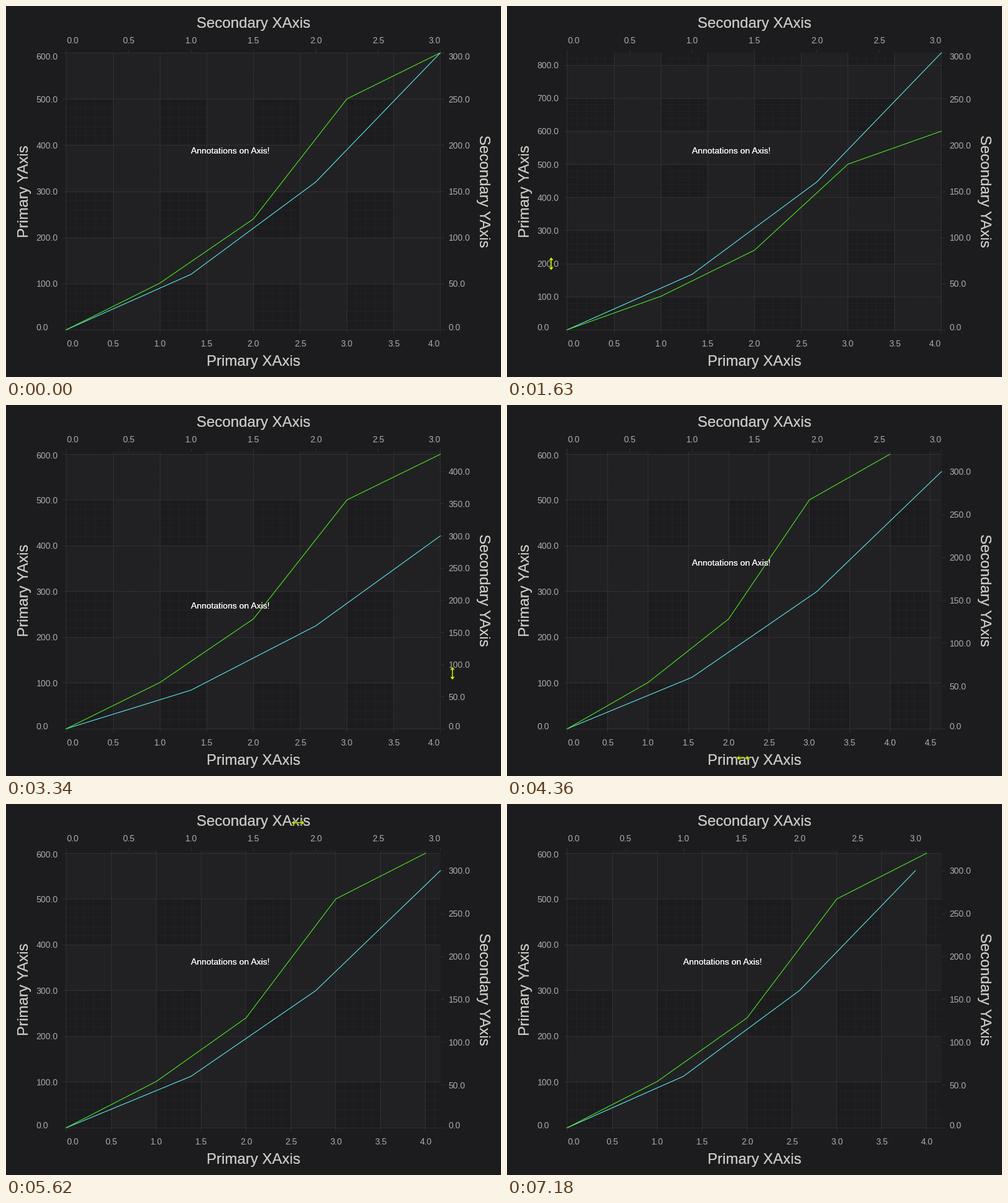
Write a matplotlib script that moves like this. It is 795 px wide and 596 px high and loops after 7710 ms.

```python
import math

import matplotlib.pyplot as plt
import numpy as np
from matplotlib.animation import FuncAnimation
from matplotlib.collections import LineCollection, PolyCollection
from matplotlib.patches import Polygon, Rectangle

plt.rcParams["font.family"] = "Liberation Sans"
plt.rcParams["text.hinting"] = "default"
plt.rcParams["toolbar"] = "None"

STAGE_W, STAGE_H, DPI = 795, 596, 100
PX = 72 / DPI  # points per pixel
STEP, FRAMES = 30, 257

LEFT, TOP, WIDTH, HEIGHT = 97, 75, 600.8, 445
RIGHT, BOTTOM = LEFT + WIDTH, TOP + HEIGHT

BG, BAND = "#1c1c1e", "#212123"
MAJOR, MINOR = "#313134", "#222225"
LABEL, TITLE = "#adadad", "#c8c7c3"
GREEN, CYAN, POINTER = "#50ff20", "#64ffff", "#c8f400"

GREEN_XY = np.array([(0, 0), (1, 101), (2, 240), (3, 500), (4, 600)])
CYAN_XY = np.array([(0, 0), (1, 60), (2, 160), (3, 300)])


class Drag:
    """Pulls one axis out and lets most of it back, along a sine arc."""

    def __init__(self, top, start, end, grab, reach, net, vertical):
        self.top, self.start, self.end = top, start, end
        self.grab, self.reach, self.net = np.array(grab), reach, net
        self.way = np.array((0, 1) if vertical else (-1, 0))
        self.size = HEIGHT if vertical else WIDTH

    def offset(self, t):
        u = np.clip((t - self.start) / (self.end - self.start), 0, 1)
        return self.net * u + self.reach * math.sin(math.pi * u)

    def axis_max(self, t):
        return self.top * math.exp(self.offset(t) / self.size)

    def point(self, t):
        return self.grab + self.way * self.offset(t)


left_drag = Drag(600, 600, 1960, (71, 266), 210, 4, True)
right_drag = Drag(300, 2560, 3730, (717, 270), 160.4, 33.2, True)
bottom_drag = Drag(4, 4180, 5150, (468, 567), 153.4, 24.3, False)
top_drag = Drag(3, 5800, 6700, (469, 30), 110, 43.3, False)
DRAGS = [left_drag, right_drag, bottom_drag, top_drag]

# Where the pointer passes between drags: time, x, y
ENTER, LEAVE = (460, 28, 258), (7180, 790, 592)
STOPS = [ENTER, (2380, 758, 265), (4090, 468, 567), (5560, 469, 30), LEAVE]
ROUTE = np.array(sorted(
    STOPS + [(t, *d.point(t)) for d in DRAGS for t in (d.start, d.end)]))


def pointer_at(t):
    for drag in DRAGS:
        if drag.start <= t <= drag.end:
            return drag.point(t)
    return [np.interp(t, ROUTE[:, 0], ROUTE[:, k]) for k in (1, 2)]


def nice_step(top):
    raw = top / 10
    base = 10 ** math.floor(math.log10(raw))
    return next(m * base for m in (1, 2, 5, 10) if m * base >= raw - 1e-9)


def ticks(top, step):
    return np.arange(int(top / step + 1e-9) + 1) * step


def to_x(v, top):
    return LEFT + WIDTH * np.asarray(v) / top


def to_y(v, top):
    return BOTTOM - HEIGHT * np.asarray(v) / top


# Grid lines sit on pixel centres
def verticals(xs, y0, y1):
    return [((x, y0), (x, y1)) for x in np.round(xs - 0.5) + 0.5]


def horizontals(ys, x0, x1):
    return [((x0, y), (x1, y)) for y in np.round(ys) + 0.5]


def rect(x0, y0, x1, y1):
    return [(x0, y0), (x1, y0), (x1, y1), (x0, y1)]


fig = plt.figure(figsize=(STAGE_W / DPI, STAGE_H / DPI), dpi=DPI, facecolor=BG)
ax = fig.add_axes([0, 0, 1, 1])
ax.set_xlim(0, STAGE_W)
ax.set_ylim(STAGE_H, 0)
ax.axis("off")


def text(x, y, s, size, color, **kw):
    return ax.text(x, y, s, fontsize=size * PX, color=color, va="baseline",
                   rotation_mode="anchor", **kw)


def strong_text(*args, **kw):
    """Two passes thicken the soft edges of the letters."""
    return [text(*args, **kw) for _ in range(2)]


def lines(color, z):
    group = LineCollection([], colors=color, linewidths=PX, zorder=z,
                           capstyle="butt", snap=False)
    return ax.add_collection(group, autolim=False)


def label_row(align):
    return [text(0, 0, "", 14, LABEL, ha=align, zorder=6) for _ in range(12)]


bands = ax.add_collection(
    PolyCollection([], facecolors=BAND, edgecolors="none", antialiaseds=False,
                   zorder=1), autolim=False)
minor, major, marks = lines(MINOR, 2), lines(MAJOR, 3), lines(MAJOR, 3)

clip = Rectangle((LEFT - 1, TOP - 0.5), WIDTH + 2, HEIGHT + 1.5,
                 transform=ax.transData)
cyan, = ax.plot([], [], color=CYAN, lw=PX, zorder=4)
green, = ax.plot([], [], color=GREEN, lw=PX, zorder=5)
for curve in (cyan, green):
    curve.set_clip_path(clip)

mid_x, mid_y = (LEFT + RIGHT) / 2, (TOP + BOTTOM) / 2
for x, y, name, turn in [(mid_x, 35, "Secondary XAxis", 0),
                         (mid_x, 578, "Primary XAxis", 0),
                         (36, mid_y, "Primary YAxis", 90),
                         (760, mid_y, "Secondary YAxis", 270)]:
    strong_text(x, y, name, 24, TITLE, ha="center", rotation=turn)

bottom_labels, top_labels = label_row("center"), label_row("center")
left_labels, right_labels = label_row("left"), label_row("left")
note = strong_text(0, 0, "Annotations on Axis!", 14, "white", ha="left",
                   zorder=7)

half = [(0, -10.5), (4, -5.5), (1, -5.5)]
half += [(x, -y) for x, y in half[::-1]]
ARROW = np.array(half + [(-x, y) for x, y in half[::-1]])
pointer = ax.add_patch(Polygon(ARROW, closed=True, facecolor=POINTER,
                               edgecolor="#20240a", lw=0.5 * PX, zorder=9))


def fill_labels(row, values, xs, ys):
    xs, ys, values = np.broadcast_arrays(xs, ys, values)
    for i, label in enumerate(row):
        label.set_visible(i < len(values))
        if i < len(values):
            label.set_text(f"{values[i]:.1f}")
            label.set_position((xs[i], ys[i]))


def fill_x(row, values, xs, baseline):
    fill_labels(row, values, np.clip(xs, LEFT + 10, RIGHT - 10), baseline)


def fill_y(row, values, ys, x):
    fill_labels(row, values, x, np.clip(ys, TOP + 6, BOTTOM - 4.5) + 5.5)


def move_pointer(t):
    x, y = pointer_at(t)
    in_x, in_y = LEFT < x < RIGHT, TOP < y < BOTTOM
    # Only shown beside the plot, over one of the axes
    pointer.set_visible(ENTER[0] <= t < LEAVE[0] and in_x != in_y)
    shape = ARROW if in_y else ARROW[:, ::-1]
    pointer.set_xy(shape + (round(x), round(y)))


def update(i):
    t = i * STEP + 10
    py, sy = left_drag.axis_max(t), right_drag.axis_max(t)
    px, sx = bottom_drag.axis_max(t), top_drag.axis_max(t)

    dx, dy = nice_step(px), nice_step(py)
    xv, yv = ticks(px, dx), ticks(py, dy)
    xs, ys = to_x(xv, px), to_y(yv, py)
    sxv, syv = ticks(sx, nice_step(sx)), ticks(sy, nice_step(sy))
    sxs, sys_ = to_x(sxv, sx), to_y(syv, sy)

    bands.set_verts(
        [rect(x, TOP, min(x + WIDTH * dx / px, RIGHT), BOTTOM)
         for x in xs[1::2]] +
        [rect(LEFT, y, RIGHT, max(y - HEIGHT * dy / py, TOP))
         for y in ys[1::2]])
    minor.set_segments(
        verticals(to_x(ticks(px, dx / 5), px), TOP, BOTTOM) +
        horizontals(to_y(ticks(py, dy / 5), py), LEFT, RIGHT))
    major.set_segments(verticals(xs, TOP, BOTTOM) +
                       horizontals(ys, LEFT, RIGHT))
    marks.set_segments(
        verticals(xs, BOTTOM, BOTTOM + 6) + verticals(sxs, TOP - 5, TOP) +
        horizontals(ys, LEFT - 5, LEFT) +
        horizontals(sys_, RIGHT + 1, RIGHT + 6))

    fill_x(bottom_labels, xv, xs, 547)
    fill_x(top_labels, sxv, sxs, 60)
    fill_y(left_labels, yv, ys, 48.5)
    fill_y(right_labels, syv, sys_, 710.5)

    green.set_data(to_x(GREEN_XY[:, 0], px), to_y(GREEN_XY[:, 1], py))
    cyan.set_data(to_x(CYAN_XY[:, 0], sx), to_y(CYAN_XY[:, 1], sy))
    for copy in note:
        copy.set_position((to_x(1, sx), to_y(200, sy) + 13.7))
    move_pointer(t)
    return []


anim = FuncAnimation(fig, update, frames=FRAMES, interval=STEP,
                     init_func=lambda: update(0), repeat=True, repeat_delay=0,
                     blit=False, cache_frame_data=False)
plt.show()
```
